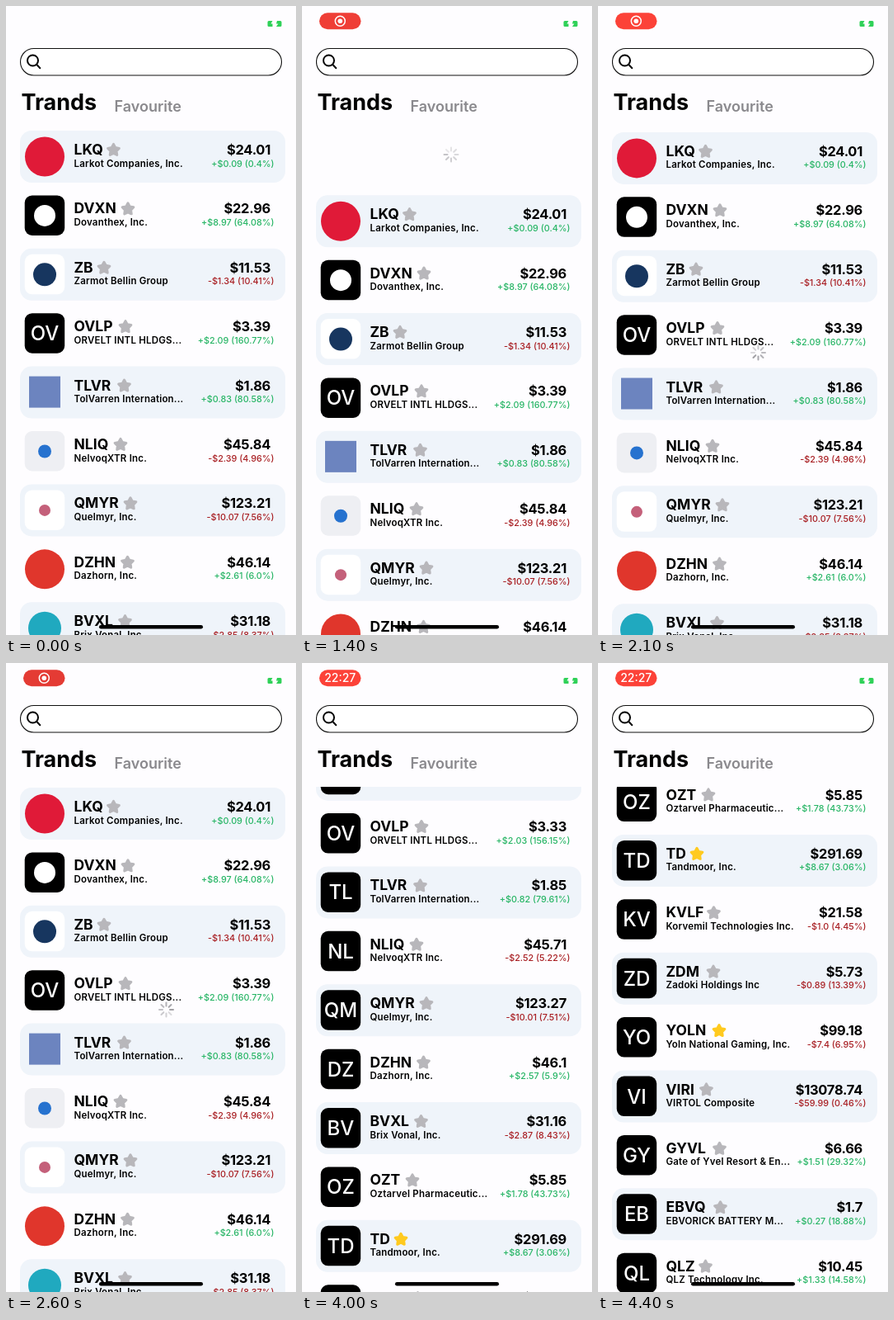
An HTML page for the animation above (4.5 s loop, 352x762 px).

```html
<!DOCTYPE html>
<html lang="en">
<head>
<meta charset="utf-8">
<title>Stock list</title>
<style>
html, body { margin: 0; height: 100%; overflow: hidden; background: #fefdff; }
svg { display: block; width: 100vw; height: 100vh; font-family: Inter, "Open Sans", sans-serif; }
.ticker { font-size: 17.5px; font-weight: 700; }
.name { font-size: 11.5px; font-weight: 600; letter-spacing: .2px; }
.price { font-size: 16.5px; font-weight: 700; letter-spacing: -.3px; text-anchor: end; }
.delta { font-size: 10.8px; font-weight: 500; text-anchor: end; }
.initials { font-size: 24px; font-weight: 500; fill: #fff; text-anchor: middle; }
</style>
</head>
<body>
<svg viewBox="0 0 352 762">
  <defs>
    <clipPath id="view"><path d="M0 150H352V762H0z"/></clipPath>
    <path id="star" stroke-width="3" stroke-linejoin="round"/>
  </defs>

  <g id="pill">
    <rect id="pillBox" x="21" y="8.2" width="50.5" height="20" rx="10"/>
    <g id="record">
      <circle cx="46.3" cy="18.3" r="6" fill="none" stroke="#fff" stroke-width="1.5"/>
      <circle cx="46.3" cy="18.3" r="2.8" fill="#fff"/>
    </g>
    <text id="clock" x="46.3" y="23.3" font-size="14" font-weight="500" fill="#fff" text-anchor="middle">22:27</text>
  </g>
  <path d="M319 18h4.5l-2 3.5h2v3.5H319q-1.5 0-1.5-1.5v-4q0-1.5 1.5-1.5zM329 18h4q1.5 0 1.5 1.5v4q0 1.5-1.5 1.5h-5l2.5-3.5H328z" fill="#2fd158"/>

  <rect x="17.5" y="51.5" width="317" height="32.5" rx="16.2" fill="#fff" stroke="#111" stroke-width="1.1"/>
  <g fill="none" stroke="#000" stroke-width="2" stroke-linecap="round">
    <circle cx="32.5" cy="66" r="6.5"/>
    <path d="M37.3 71l4 4.2"/>
  </g>
  <text x="18.5" y="126" font-size="27" font-weight="700">Trands</text>
  <text x="131.5" y="128" font-size="18" font-weight="600" fill="#8a898d">Favourite</text>

  <g clip-path="url(#view)">
    <g id="pullSpin"></g>
    <g id="oldList"></g>
    <g id="newList"></g>
  </g>
  <g id="loadSpin"></g>
  <rect x="113" y="750" width="126" height="4.5" rx="2.25"/>
</svg>
<script>
const LOOP = 4500, PITCH = 71.4, TOP = 151;
const RELOAD = 3000, CLOCK = 3500;
const $ = id => document.getElementById(id);
const clamp = v => Math.max(0, Math.min(1, v));

// ticker | name | star x | price | change | reloaded price | reloaded change
const stocks = `LKQ|Larkot Companies, Inc.|130.5|24.01|+$0.09 (0.4%)
DVXN|Dovanthex, Inc.|148|22.96|+$8.97 (64.08%)
ZB|Zarmot Bellin Group|119|11.53|-$1.34 (10.41%)
OVLP|ORVELT INTL HLDGS...|145|3.39|+$2.09 (160.77%)|3.33|+$2.03 (156.15%)
TLVR|TolVarren Internation...|143.5|1.86|+$0.83 (80.58%)|1.85|+$0.82 (79.61%)
NLIQ|NelvoqXTR Inc.|139|45.84|-$2.39 (4.96%)|45.71|-$2.52 (5.22%)
QMYR|Quelmyr, Inc.|151|123.21|-$10.07 (7.56%)|123.27|-$10.01 (7.51%)
DZHN|Dazhorn, Inc.|147.5|46.14|+$2.61 (6.0%)|46.1|+$2.57 (5.9%)
BVXL|Brix Vonal, Inc.|144.5|31.18|-$2.85 (8.37%)|31.16|-$2.87 (8.43%)
OZT|Oztarvel Pharmaceutic...|134|5.85|+$1.78 (43.73%)
TD|Tandmoor, Inc.|120|291.69|+$8.67 (3.06%)
KVLF|Korvemil Technologies Inc.|140.5|21.58|-$1.0 (4.45%)
ZDM|Zadoki Holdings Inc|140|5.73|-$0.89 (13.39%)
YOLN|Yoln National Gaming, Inc.|147|99.18|-$7.4 (6.95%)
VIRI|VIRTOL Composite|131.5|13078.74|-$59.99 (0.46%)
GYVL|Gate of Yvel Resort &amp; En...|147.5|6.66|+$1.51 (29.32%)
EBVQ|EBVORICK BATTERY M...|148.5|1.7|+$0.27 (18.88%)
QLZ|QLZ Technology Inc.|130.5|10.45|+$1.33 (14.58%)`.split("\n").map(s => s.split("|"));
const starred = ["TD", "YOLN"];

const tile = fill => `<rect x="22.7" y="7" width="48.5" height="48.5" rx="9" fill="${fill}"/>`;
const dot = (r, fill) => `<circle cx="47" cy="31.5" r="${r}" fill="${fill}"/>`;
const initials = ticker => tile("#000") +
  `<text class="initials" x="47" y="40">${ticker.slice(0, 2)}</text>`;
const icons = [
  dot(24, "#e01a38"),
  tile("#000") + dot(13, "#fff"),
  tile("#fff") + dot(14, "#17365f"),
  null,
  `<rect x="28" y="12" width="38" height="38" fill="#6c84bf"/>`,
  tile("#eeeff3") + dot(8, "#2672cf"),
  tile("#fff") + dot(7, "#c4607a"),
  dot(24, "#e0362c"),
  dot(20, "#20a9bf")
];

function row([ticker, name, starX, price, delta, price2, delta2], i, reloaded) {
  if (reloaded && price2) [price, delta] = [price2, delta2];
  const star = starred.includes(ticker) ? "#ffca1f" : "#b8b7bb";
  const tint = delta[0] === "+" ? "#27b565" : "#a81e22";
  return `<g transform="translate(0 ${TOP + i * PITCH})">
    ${i % 2 ? "" : '<rect x="17" width="322" height="63" rx="14" fill="#eff4fa"/>'}
    ${!reloaded && icons[i] || initials(ticker)}
    <text class="ticker" x="82.5" y="29">${ticker}</text>
    <use href="#star" x="${starX}" y="23.6" fill="${star}" stroke="${star}"/>
    <text class="name" x="82.5" y="43.5">${name}</text>
    <text class="price" x="321" y="29">$${price}</text>
    <text class="delta" x="325.5" y="43.5" fill="${tint}">${delta}</text></g>`;
}

const points = Array.from({ length: 10 }, (_, i) => {
  const a = i * Math.PI / 5, r = i % 2 ? 3.8 : 7.2;
  return [r * Math.sin(a), -r * Math.cos(a)];
});
$("star").setAttribute("d", "M" + points.join("L") + "z");
$("oldList").innerHTML = stocks.slice(0, 9).map((s, i) => row(s, i, false)).join("");
$("newList").innerHTML = stocks.map((s, i) => row(s, i, true)).join("");

const spokes = Array.from({ length: 8 }, (_, i) =>
  `<path d="M0-4.5V-8.5" transform="rotate(${i * 45})" stroke="#77767c" stroke-width="2" stroke-linecap="round"/>`).join("");
$("pullSpin").innerHTML = $("loadSpin").innerHTML = spokes;

function spin(g, x, y, t, alpha) {
  const head = Math.floor(t / 100) % 8;
  g.setAttribute("transform", `translate(${x} ${y})`);
  g.setAttribute("opacity", alpha);
  [...g.children].forEach((p, i) =>
    p.setAttribute("opacity", 0.25 + 0.6 * (1 - (head - i + 8) % 8 / 8)));
}

// A finger pulls the list down, then a damped spring returns it.
function pull(t) {
  if (t < 1597) return 110 * Math.sin(Math.PI / 2 * clamp((t - 1200) / 397));
  const u = (t - 1597) * 0.0119;
  return 110 * (1 + u) * Math.exp(-u);
}

function scroll(t) {
  const u = clamp((t - 3700) / 930);
  return 776 * u * u * (3 - 2 * u);
}

const show = (id, on) => $(id).setAttribute("display", on ? "inline" : "none");
const shift = (id, y) => $(id).setAttribute("transform", `translate(0 ${y})`);

function draw(time) {
  const t = Math.floor(time % LOOP / 100) * 100;
  const glow = Math.cos((t - 1900) / 2300 * 2 * Math.PI);
  show("pill", t >= 100);
  show("record", t < CLOCK);
  show("clock", t >= CLOCK);
  $("pillBox").setAttribute("fill", `rgb(${235 + 20 * glow},${61 + 6 * glow},${53 + 4 * glow})`);

  show("oldList", t < RELOAD);
  show("newList", t >= RELOAD);
  shift("oldList", pull(t));
  shift("newList", -scroll(t));

  const fade = t < 1600 ? clamp((t - 1300) / 200) : 0.2 * clamp((1900 - t) / 200);
  spin($("pullSpin"), 181, 180, t, fade);
  spin($("loadSpin"), 194.5, 420, t, t >= 1600 && t < RELOAD ? 0.8 : 0);
}

let start;
function tick(now) {
  start ??= now;
  draw(now - start);
  requestAnimationFrame(tick);
}
requestAnimationFrame(tick);
</script>
</body>
</html>
```
